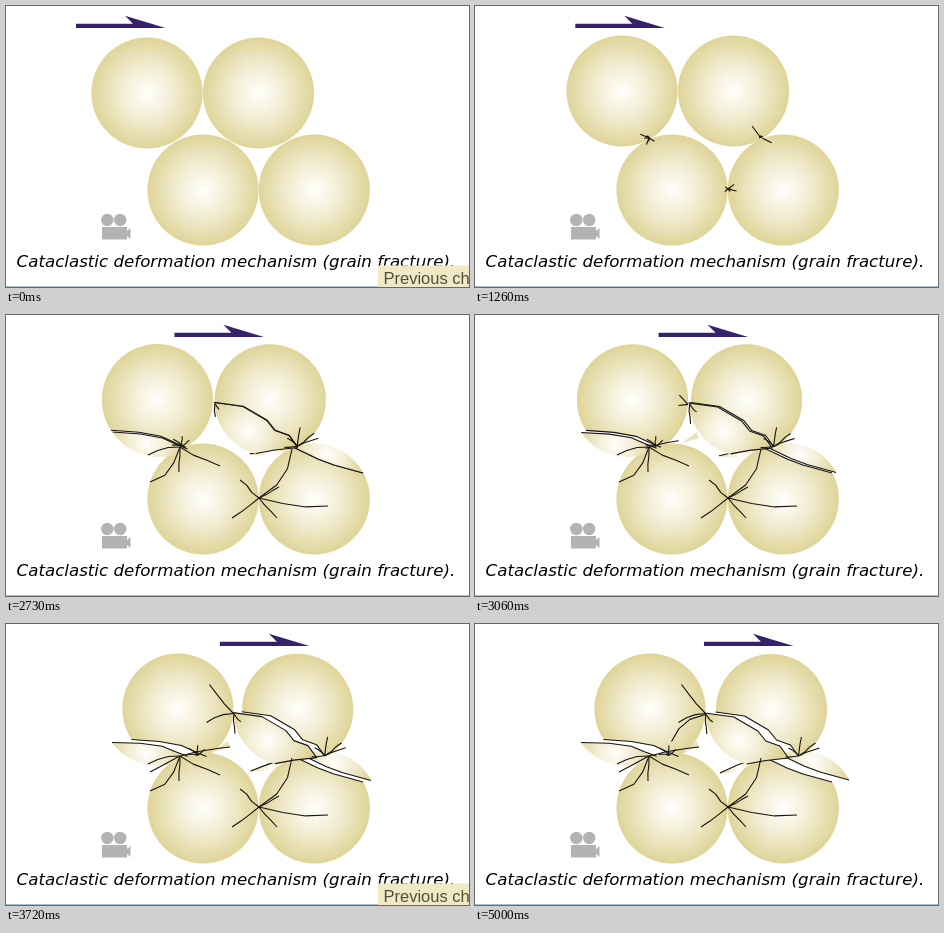
Animation, 463 px wide and 281 px high, one loop 5.2 s. Source, as an HTML page with a canvas:

```html
<!DOCTYPE html>
<html lang="en">
<head>
<meta charset="utf-8">
<title>Grain fracture</title>
<style>
  html, body { margin: 0; width: 100%; height: 100%; overflow: hidden; background: #fff; }
  canvas, svg { position: absolute; left: 0; top: 0; width: 463px; height: 281px; }
  .caption { font: italic 16.66px "DejaVu Sans", Verdana, sans-serif; }
  .hint { font: 16.5px "Liberation Sans", Arial, sans-serif; fill: #50503f; }
</style>
</head>
<body>
<canvas id="stage"></canvas>
<svg viewBox="0 0 463 281">
  <g fill="#b3b3b3">
    <circle cx="101.3" cy="214" r="6.2"/>
    <circle cx="114.2" cy="214" r="6.2"/>
    <path d="M96 221H121V225L124.5 222V233L121 230V233.5H96Z"/>
  </g>
  <text class="caption" x="10.6" y="261">Cataclastic deformation mechanism (grain fracture).</text>
  <path d="M0 280.5H463" stroke="#a9bfca"/>
  <g id="hint">
    <path d="M372 259.5H463V281H372Z" fill="#efe9c6"/>
    <text class="hint" x="377.5" y="277.5">Previous chapter</text>
  </g>
</svg>
<script>
const LOOP = 5200, RADIUS = 55.6, LAST_STEP = 21, SPLIT = 10;

// The shear advances every two or three ticks of a 15 Hz clock.
const stepTimes = Array.from({ length: LAST_STEP }, (_, n) =>
  66.6 * Math.round(11.024 + 2.496 * n) - 11);

const canvas = document.getElementById('stage');
const hint = document.getElementById('hint');
const ctx = canvas.getContext('2d');
const ratio = window.devicePixelRatio || 1;
canvas.width = 463 * ratio;
canvas.height = 281 * ratio;

const part = (step, from, to) => Math.min(1, Math.max(0, (step - from) / (to - from)));
const slide = (step, from, to, power = 1) =>
  Math.sin(Math.PI / 2 * part(step, from, to) ** power);

// The upper grains first settle onto the lower ones.
function settle(step) {
  const lift = 1 - part(step, 0, 3);
  return step < SPLIT ? [-1.5 - 6 * lift, .5 + 2 * lift] : [0, 0];
}

// Offset x, offset y and rotation in degrees of each moving body.
const motions = {
  fixed: () => [0, 0, 0],
  left(s) {
    const [x, y] = settle(s);
    return [x + 26.5 * slide(s, 11, 21, 1.65), y + .5 * part(s, 10, 17), 0];
  },
  right(s) {
    const [x, y] = settle(s);
    return [x + 36.5 * slide(s, 10, 21, 2), y + part(s, 10, 21), 0];
  },
  leftStar: s => motions.left(s).map(v => v * .75),
  leftChip: s => [4.5 * slide(s, 10, 13), 2 * slide(s, 10, 13), -2.5 * slide(s, 14, 18)],
  rightChip: s => [25.8 * slide(s, 10, 21, 1.8), 2 * part(s, 10, 21), 0],
  wedge: s => [-2 * slide(s, 10, 13), 6 * slide(s, 10, 21, 2), -14 * slide(s, 10, 21, 3)],
  sliver: s => [8 * part(s, 13, 17) + 9 * part(s, 19, 21), -2 * part(s, 13, 21), 0]
};

const grains = {
  topLeft: [148.5, 84.5], topRight: [260, 84.5], lowLeft: [197, 184], lowRight: [308.3, 184]
};

// Seams run outwards from the contact between two grains.
const seams = {
  left: [[177, 132], [165, 127], [152, 121], [130, 117], [102, 115]],
  right: [[287, 131], [279, 120], [265, 115], [257, 105], [233, 91], [204, 87]],
  base: [[288, 132], [265, 134.5], [246, 138]],
  cap: [[287, 132], [312, 144], [328, 150], [357, 158]]
};

// Highlight x, y and radius of the broken pieces; x and y are also the pivot.
const glows = {
  leftChip: [136, 127, 38], rightChip: [239, 115, 43], wedge: [267, 137, 24], sliver: [321, 140, 38]
};

// Cracks spread from one point to several tips; a third value bends a ray sideways.
const bursts = [
  { body: 'fixed', at: [253, 183], from: 3, to: 11,
    tips: [[234, 165], [226, 203], [271, 203], [322, 191, 3], [273, 172], [286, 134, 7]] },
  { body: 'fixed', at: [174, 132], from: 3, to: 10,
    tips: [[214, 151, 1], [173, 157], [144, 167, -6], [142, 140, 2]] },
  { body: 'leftStar', at: [174, 131], from: 3, to: 9,
    tips: [[165, 124], [174, 121], [164, 130], [181, 125]] },
  { body: 'right', at: [287, 131], from: 3, to: 12,
    tips: [[277, 123], [290, 112], [304, 118], [308, 123], [274, 132]] },
  { body: 'rightChip', at: [205, 88], from: 11, to: 14, tips: [[206, 108], [212, 96]] },
  { body: 'left', at: [204, 89], from: 14, to: 17, tips: [[180, 60], [177, 98, 2]] },
  { body: 'left', at: [204, 90], from: 19, to: 21, tips: [[170, 117, 6]] },
  { body: 'fixed', at: [190, 128], from: 13, to: 18, tips: [[144, 148, 2], [224, 123]] }
];

let seed = 7;
const jitter = () => {
  seed = seed * 16807 % 2147483647;
  return seed / 2147483647 * 2 - 1;
};

function ray([x, y], [tipX, tipY, bend = 0]) {
  const dx = tipX - x, dy = tipY - y, length = Math.hypot(dx, dy);
  const joints = [.35, .68].map(t => {
    const shift = (bend + jitter()) / length;
    return [x + dx * t - dy * shift, y + dy * t + dx * shift];
  });
  return [[x, y], ...joints, [tipX, tipY]];
}
bursts.forEach(burst => burst.rays = burst.tips.map(tip => ray(burst.at, tip)));

function inBody(body, step, draw) {
  const [dx, dy, angle] = motions[body](step);
  const [px, py] = glows[body] || [0, 0];
  ctx.save();
  ctx.translate(px + dx, py + dy);
  ctx.rotate(angle * Math.PI / 180);
  ctx.translate(-px, -py);
  draw();
  ctx.restore();
}

function trace(points) {
  ctx.beginPath();
  points.forEach(p => ctx.lineTo(...p));
}

function fillShape(points, color) {
  trace(points);
  ctx.fillStyle = color;
  ctx.fill();
}

function strokeCrack(points, amount) {
  if (amount <= 0) return;
  const length = points.slice(1).reduce((sum, p, i) =>
    sum + Math.hypot(p[0] - points[i][0], p[1] - points[i][1]), 0);
  ctx.setLineDash(amount < 1 ? [length * amount, 999] : []);
  trace(points);
  ctx.stroke();
}

function clipSide(seam, above) {
  const first = seam[0], last = seam[seam.length - 1];
  const reach = Math.sign(last[0] - first[0]) * 80;
  const edge = above ? -20 : 300;
  const start = first[0] - reach, end = last[0] + reach;
  trace([[start, first[1]], ...seam, [end, last[1]], [end, edge], [start, edge]]);
  ctx.clip();
}

function fillGrain([x, y], [glowX, glowY, size] = [x, y, RADIUS]) {
  const shade = ctx.createRadialGradient(glowX, glowY, 0, glowX, glowY, size);
  shade.addColorStop(0, '#fffffc');
  shade.addColorStop(.5, '#f1ecd0');
  shade.addColorStop(1, '#dfd498');
  ctx.fillStyle = shade;
  ctx.beginPath();
  ctx.arc(x, y, RADIUS, 0, Math.PI * 2);
  ctx.fill();
}

// Each cut is a seam and whether the part above it stays.
function piece(body, step, grain, cuts) {
  inBody(body, step, () => {
    ctx.save();
    if (step > SPLIT) cuts.forEach(([seam, above]) => clipSide(seams[seam], above));
    fillGrain(grains[grain], step > SPLIT ? glows[body] : undefined);
    ctx.restore();
    cuts.forEach(([seam]) => strokeCrack(seams[seam], part(step, 3, 10)));
  });
}

function drawGrains(step) {
  const broken = step > SPLIT;
  piece('fixed', step, 'lowLeft', []);
  piece('fixed', step, 'lowRight', [['cap', false]]);
  if (broken) {
    piece('sliver', step, 'lowRight', [['cap', true]]);
    piece('leftChip', step, 'topLeft', [['left', false]]);
    piece('wedge', step, 'topRight', [['base', false]]);
    piece('rightChip', step, 'topRight', [['right', false], ['base', true]]);
  }
  piece('left', step, 'topLeft', [['left', true]]);
  piece('right', step, 'topRight', [['right', true]]);
  if (step > 14) fillShape([[207, 128], [222, 117], [224, 123]], '#e9e1b8');
}

function drawCracks(step) {
  for (const { body, from, to, rays } of bursts) {
    inBody(body, step, () => rays.forEach(points => strokeCrack(points, part(step, from, to))));
  }
}

function drawArrow(step) {
  const x = 70 + step * 159 / LAST_STEP;
  const shape = [[0, 17.8], [57, 17.8], [49, 9.8], [89.5, 22], [0, 22]];
  fillShape(shape.map(p => [p[0] + x, p[1]]), '#36216b');
}

function render(now) {
  const time = now % LOOP;
  const step = stepTimes.filter(t => t <= time).length;
  ctx.setTransform(ratio, 0, 0, ratio, 0, 0);
  ctx.clearRect(0, 0, 463, 281);
  ctx.strokeStyle = '#15120f';
  ctx.lineWidth = 1.1;
  ctx.lineJoin = 'round';
  drawGrains(step);
  drawCracks(step);
  drawArrow(step);
  const hinted = time < 70 || (time >= 3650 && time < 3790);
  hint.style.visibility = hinted ? 'visible' : 'hidden';
}

const start = performance.now();
function tick() {
  render(performance.now() - start);
  requestAnimationFrame(tick);
}
tick();
</script>
</body>
</html>
```
